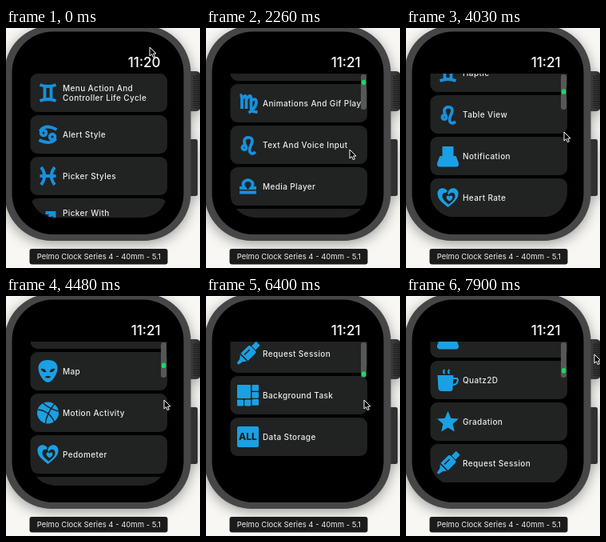
Animation, 243 px wide and 300 px high, one loop 8 s. Source, as an HTML page:

```html
<!DOCTYPE html>
<html lang="en">
<head>
<meta charset="utf-8">
<title>Watch menu</title>
<style>
  html, body { margin: 0; width: 100%; height: 100%; overflow: hidden; background: #f8f7f3; }
  svg { display: block; width: 243px; height: 300px; font-family: Inter, Roboto, sans-serif; }
  #case { filter: drop-shadow(0 4px 8px rgba(0, 0, 0, .36)); }
  .row { fill: #212222; }
  .label { fill: #ececec; font-size: 10px; font-weight: 500; letter-spacing: .38px; }
  .line { fill: none; stroke: #1890dc; stroke-width: 3.8; }
  .solid { fill: #1aa0e4; }
  .cut { fill: #212222; }
  .slit { fill: none; stroke: #212222; stroke-width: 1.6; }
</style>
</head>
<body>
<svg viewBox="0 0 243 300">
  <defs>
    <linearGradient id="crown">
      <stop offset="0" stop-color="#1b1b1c"/>
      <stop offset=".5" stop-color="#3c3c3d"/>
      <stop offset="1" stop-color="#2a2a2b"/>
    </linearGradient>
    <pattern id="ridges" width="8" height="2.6" patternUnits="userSpaceOnUse">
      <rect width="8" height="1" fill="#1c1c1d"/>
    </pattern>
    <clipPath id="screen">
      <path d="M30 57H202V205Q202 205 202 205A32 32 0 0 1 170 237H62A32 32 0 0 1 30 205Z"/>
    </clipPath>
    <clipPath id="words"><rect x="66" y="0" width="129.5" height="1400"/></clipPath>
  </defs>

  <rect width="243" height="300" fill="#f8f7f3"/>
  <g id="case">
    <rect x="224" y="54" width="20" height="50" rx="6" fill="url(#crown)"/>
    <rect x="234" y="58" width="9" height="42" fill="url(#ridges)"/>
    <rect x="226" y="139" width="14" height="71" rx="2.5" fill="#303032"/>
    <rect x="-2" y="-3" width="233.5" height="269" rx="59" fill="#464647"/>
  </g>
  <rect x="7.5" y="4.5" width="215" height="253.5" rx="51" fill="#000"/>

  <text id="clock" x="193.5" y="48.7" text-anchor="end" fill="#fff" font-size="17" font-weight="500"></text>
  <g clip-path="url(#screen)"><g id="list"></g></g>
  <g id="bar">
    <rect x="194" y="58" width="7" height="44" rx="3" fill="#565757"/>
    <rect id="thumb" x="194.9" width="5.3" height="6.5" rx="2.6" fill="#1fd663"/>
  </g>

  <rect x="29.5" y="276" width="173" height="19.5" rx="3" fill="#1b1b1c"/>
  <text x="116.3" y="289.3" text-anchor="middle" fill="#ededed" font-size="9.5">Pelmo Clock Series 4 - 40mm - 5.1</text>

  <path id="cursor" d="M0 0V11L2.6 8.7 4.3 12.6 6.3 11.8 4.6 8H8Z" fill="#000" stroke="#fff"/>
</svg>

<script>
const $ = id => document.getElementById(id);
const line = d => `<path class="line" d="${d}"/>`;
const solid = d => `<path class="solid" d="${d}"/>`;
const cut = d => `<path class="cut" d="${d}"/>`;
const slit = d => `<path class="slit" d="${d}"/>`;
const box = (x, y, w, h) => `<rect class="solid" x="${x}" y="${y}" width="${w}" height="${h}" rx="1"/>`;
const ring = (x, y, r) => `<circle class="line" cx="${x}" cy="${y}" r="${r}"/>`;
const disc = r => `<circle class="solid" r="${r}"/>`;
const starPath = 'M' + Array.from({ length: 10 }, (_, i) => {
  const r = i % 2 ? 6.4 : 14.2, a = i * Math.PI / 5;
  return `${(r * Math.sin(a)).toFixed(1)} ${(1 - r * Math.cos(a)).toFixed(1)}`;
}).join('L') + 'Z';
const heart = 'M0 12C-9 5-13 1-13-5C-13-13-3-14 0-7C3-14 13-13 13-5C13 1 9 5 0 12Z';

const icons = {
  gemini: line('M-10-10Q0-6 10-10M-10 10Q0 6 10 10M-4-8V8M4-8V8'),
  cancer: ring(-5.5, -2, 3.4) + ring(5.5, 3, 3.4) + line('M-10-4Q-4-14 11-6M10 5Q4 14-11 7'),
  pisces: line('M-8.5-11Q0 0-8.5 11M8.5-11Q0 0 8.5 11M-10 0H10'),
  archer: line('M-9 9L7-6M-3-6H8V4M-8-1L1 8'),
  virgo: line('M-10-10Q-7.5-10-7.5-6V7M-7.5-5Q-2-13-2-5V7M-2-5Q4-13 4-5V6Q4 11 12 11M4-3Q11-8 10.5 0Q9 7 1 12'),
  leo: ring(-4.5, 3.5, 2.6) + line('M-3 1Q-7-7-1-9Q7-10 5-2Q1 5 2.5 9Q5 13 9.5 9'),
  libra: line('M-10.5 7.5H10.5M-10.5 2H-4Q-8-3-4.5-6Q0-10 4.5-6Q8-3 4 2H10.5'),
  twist: line('M-10-9Q0 5 12-9M-10 9Q0-5 12 9'),
  mask: solid('M0-14C8-14 12-10 12-4C12 4 5 14 0 14C-5 14-12 4-12-4C-12-10-8-14 0-14Z') +
    cut('M-9-3Q-4-4-2 1Q-7 2-9-3ZM9-3Q4-4 2 1Q7 2 9-3ZM-4 7Q0 5 4 7Q0 10-4 7Z'),
  ball: disc(13.5) + slit('M-13-4Q1-3 8 11M-6-12Q2-5 13-2M-3 13Q-2 2 8-11'),
  heart: solid(heart) + `<path class="cut" d="${heart}" transform="translate(1 1) scale(.62)"/>` +
    `<path class="solid" d="${heart}" transform="translate(2 1) scale(.3)"/>` + slit('M0-8L-3-3'),
  stamp: solid('M-7-12H7V0H10Q11 2 13.5 9Q14 13 11 13.5H-11Q-14 13-13.5 9Q-11 2-10 0H-7Z'),
  cup: solid('M-13-6H7L6 11Q6 14 3 14H-8Q-11 14-12 11Z') +
    '<path class="line" style="stroke:#1aa0e4;stroke-width:2.2" d="M6-2H11Q13-2 12 2Q11 6 6 6M-4-8Q-7-10-4-13M2-8Q-1-10 2-13"/>',
  star: solid(starPath),
  marker: '<g transform="rotate(45)">' +
    solid('M-6.5-6Q-6.5-9-4-9H4Q6.5-9 6.5-6V7L2.5 12 1.5 18H-1.5L-2.5 12-6.5 7ZM-3.5-18H3.5V-10H-3.5Z') +
    slit('M-2-5V4M-6.5 7H6.5') + '</g>',
  tiles: box(-13.5, -13, 17, 17) + [-13, -4, 5].map(y => box(5, y, 8.5, 7.7)).join('') +
    box(-13.5, 5.5, 8, 8) + box(-4.3, 5.5, 8, 8),
  all: '<rect class="solid" x="-13.5" y="-13" width="27" height="26" rx="2"/>' +
    '<text class="cut" y="4.4" text-anchor="middle" font-size="12" font-weight="800">ALL</text>',
  disc: disc(12) + cut('M-4-6L7 0-4 6Z')
};

const rows = [
  ['gemini', 'Menu Action And', 'Controller Life Cycle'],
  ['cancer', 'Alert Style'],
  ['pisces', 'Picker Styles'],
  ['archer', 'Picker With', 'Images'],
  ['virgo', 'Animations And Gif Player'],
  ['leo', 'Text And Voice Input'],
  ['libra', 'Media Player'],
  ['twist', 'Record Audio'],
  ['disc', 'Play Audio'],
  ['cancer', 'Gesture'],
  ['gemini', 'Haptic'],
  ['leo', 'Table View'],
  ['stamp', 'Notification'],
  ['heart', 'Heart Rate'],
  ['disc', 'Location'],
  ['mask', 'Map'],
  ['ball', 'Motion Activity'],
  ['heart', 'Pedometer'],
  ['stamp', 'Timer'],
  ['cup', 'Quatz2D'],
  ['star', 'Gradation'],
  ['marker', 'Request Session'],
  ['tiles', 'Background Task'],
  ['all', 'Data Storage']
];

$('list').innerHTML = rows.map(([icon, ...words], i) => {
  const y = 81 + 52 * i;
  const text = words.map((w, j) =>
    `<text class="label" x="71" y="${y + 3.6 + 12 * (j - (words.length - 1) / 2)}">${w}</text>`).join('');
  return `<rect class="row" x="30.5" y="${y - 24}" width="171.5" height="48" rx="9"/>` +
    `<g transform="translate(52.5 ${y})">${icons[icon]}</g><g clip-path="url(#words)">${text}</g>`;
}).join('');

const scroll = [[0, 0], [7, 0], [8, 35], [9, 75], [11, 75], [12, 115], [14, 195], [16, 203], [20, 203],
  [22, 215], [25, 450], [28, 735], [29, 767], [31, 800], [32, 800], [33, 860], [35, 1047],
  [36, 1080], [38, 1094], [39, 1094], [42, 1101], [46, 1094], [48, 1094], [52, 964]];
const pointer = [[0, 180, 24], [1, 172, 62], [2, 156, 120], [3, 143, 166], [4, 141, 178], [11, 141, 178],
  [14, 180, 152], [16, 198, 130], [43, 198, 130], [46, 234, 75], [47, 236, 73]];
const maxScroll = 1094;

function at(keys, n, col = 1) {
  const i = keys.findIndex(k => k[0] >= n);
  if (i < 0) return keys[keys.length - 1][col];
  if (i === 0) return keys[0][col];
  const a = keys[i - 1], b = keys[i];
  return a[col] + (b[col] - a[col]) * (n - a[0]) / (b[0] - a[0]);
}

const stepAt = t => t < 300 ? 0
  : t < 1955 ? 1 + Math.floor((t - 300) / 148.5)
  : 12 + Math.floor((t - 1955) / 148);

function barOpacity(n) {
  if (n < 8 || n === 19 || n === 20 || n === 47 || n === 48) return 0;
  return n === 18 ? .5 : 1;
}

function draw(now) {
  const n = Math.min(52, stepAt(now % 8000));
  const s = at(scroll, n);
  $('clock').textContent = n < 8 ? '11:20' : '11:21';
  $('list').setAttribute('transform', `translate(0 ${-s})`);
  $('thumb').setAttribute('y', 58.3 + 36 * Math.min(1, s / maxScroll));
  $('bar').setAttribute('opacity', barOpacity(n));
  $('cursor').setAttribute('transform', `translate(${at(pointer, n)} ${at(pointer, n, 2)})`);
  requestAnimationFrame(draw);
}
draw(performance.now());
</script>
</body>
</html>
```
